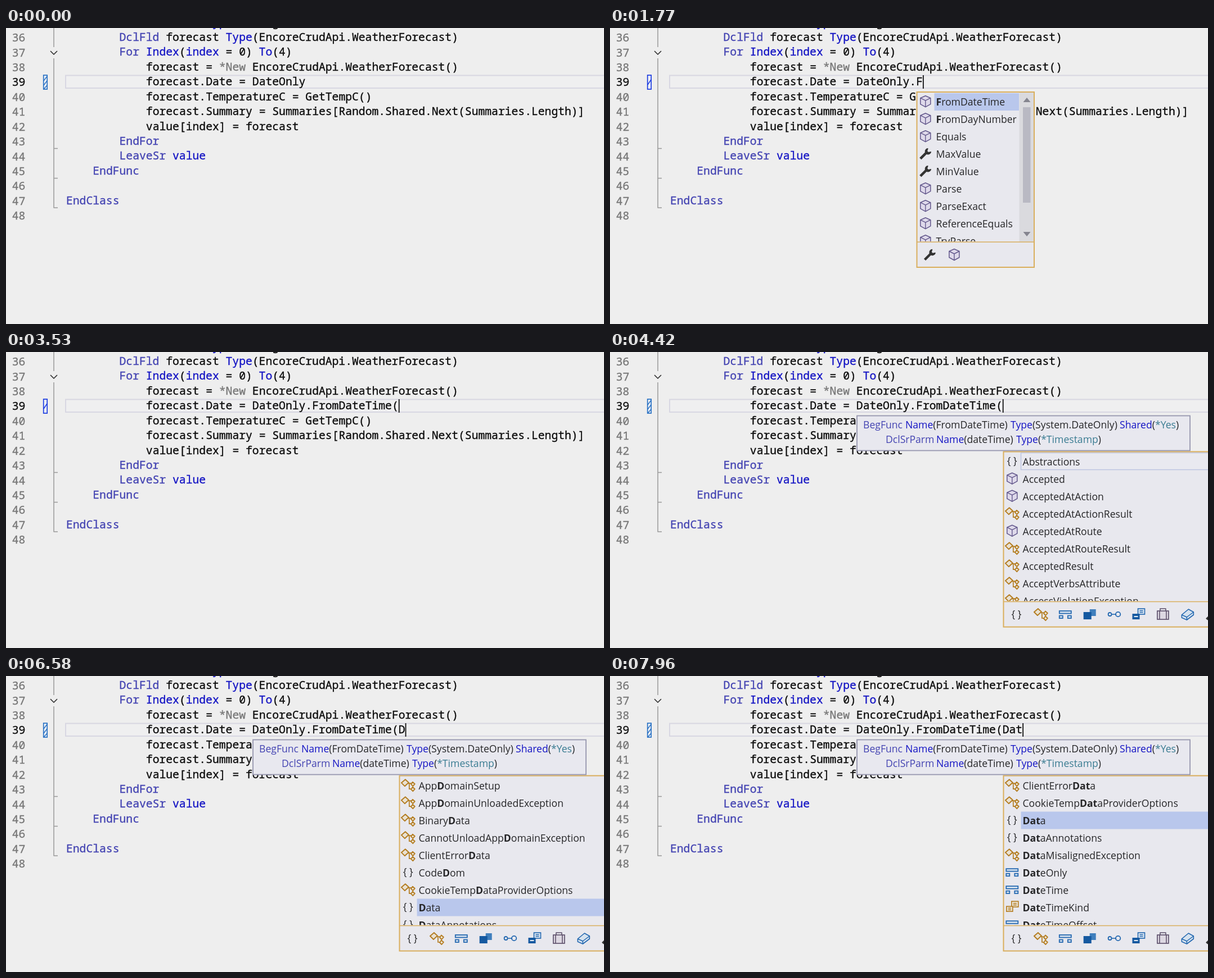
An HTML page that plays this animation: 1063 px wide and 527 px high, repeating every 8000 ms.

```html
<!DOCTYPE html>
<html lang="en">
<head>
<meta charset="utf-8">
<title>Code completion</title>
<style>
html, body { margin: 0; width: 100%; height: 100%; overflow: hidden; background: #eee; }
svg { display: block; }
text { white-space: pre; }
text, tspan { fill: currentColor; }
.code { font: 19.7px "Noto Sans Mono", monospace; color: #0c0c0c; stroke-width: 0.35; }
.code, .code tspan { stroke: currentColor; }
.ui { font: 17.6px "Open Sans", sans-serif; color: #262628; }
.num { color: #777; }
.now { color: #111; }
.key { color: #4444b2; }
.name { color: #1414c4; }
.grey { color: #777; }
.teal { color: #3a7c92; }
.bold { font-weight: 700; }
</style>
</head>
<body>
<svg id="stage" width="1063" height="527" viewBox="0 0 1063 527">
  <defs><clipPath id="rows"><rect width="520" height="266"/></clipPath></defs>
  <g id="base"></g>
  <g id="live"></g>
</svg>
<script>
const LOOP = 8000, CHAR = 11.82, LINE = 26.42, LEFT = 107;
const $ = id => document.getElementById(id);
const lineY = i => 23 + i * LINE;
const colX = c => LEFT + c * CHAR;
const text = (x, y, s, cls) => `<text x="${x}" y="${y}" class="${cls}">${s}</text>`;
const span = (cls, s) => `<tspan class="${cls}">${s}</tspan>`;
const rect = (x, y, w, h, fill, stroke = 'none', sw = 1.6) =>
  `<rect x="${x}" y="${y}" width="${w}" height="${h}" fill="${fill}" stroke="${stroke}" stroke-width="${sw}"/>`;
const path = (d, stroke, sw = 1.6, fill = 'none') =>
  `<path d="${d}" fill="${fill}" stroke="${stroke}" stroke-width="${sw}" stroke-linejoin="round"/>`;
const move = (x, y, s) => `<g transform="translate(${x} ${y})">${s}</g>`;

// Static code, one entry per line from 36 on; line 39 is typed live.
const code = [
  '        DclFld forecast Type(EncoreCrudApi.WeatherForecast)',
  '        For Index(index = 0) To(4)',
  '            forecast = *New EncoreCrudApi.WeatherForecast()',
  '',
  '            forecast.TemperatureC = GetTempC()',
  '            forecast.Summary = Summaries[Random.Shared.Next(Summaries.Length)]',
  '            value[index] = forecast',
  '        EndFor',
  '        LeaveSr value',
  '    EndFunc',
  '',
  'EndClass',
  ''
];
const paint = s => s
  .replace(/DclFld|For(?= )|LeaveSr|End(For|Func|Class)|Type|Index|To(?=\()|index(?= =)|value$|\*New/g,
    w => span(w[0] == '*' ? 'grey' : /^(Type|Index|To|index|value)$/.test(w) ? 'name' : 'key', w));
const codeLine = (i, s) => {
  const body = s.trimStart();
  return text(colX(s.length - body.length), lineY(i), paint(body), 'code');
};

$('base').innerHTML =
  rect(106, 84.5, 970, 22.5, '#efeff0', '#d8d7e2', 2) +
  text(colX(21), lineY(-1), 'Type', 'code name') + text(colX(31), lineY(-1), 'g', 'code') +
  code.map((s, i) => text(10.8, lineY(i) + 1.2, 36 + i, 'code ' + (i == 3 ? 'now' : 'num')) + codeLine(i, s)).join('') +
  path('M85 0V34M85 54V320H92M85 214.5H92M85 267.5H92', '#999', 1.5) +
  path('M79 41L85 47L91 41', '#333', 1.7);

// Icons, each centred on 0,0.
const BLUE = '#2468b0', GOLD = '#b37c20', PURPLE = '#63588c', DARK = '#333', PALE = '#e9e1d2';
const box = (c, fill) => rect(-1, -10, 12, 10, fill, c) + path('M2 -6.5H8M2 -3.5H8', c, 1.4);
const icons = {
  cube: path('M0 -10L9 -6V5L0 10L-9 5V-6Z', PURPLE, 1.5, '#ded9ea') + path('M-9 -6L0 -1.5L9 -6M0 -1.5V10', PURPLE, 1.4),
  wrench: path('M-9 9L2 -2', DARK, 4.5) + path('M4 -9A5 5 0 1 0 9.5 -3L5 -2L2.5 -4.5Z', DARK, 1.5, DARK),
  space: `<text y="6" text-anchor="middle" class="ui">{ }</text>`,
  type: path('M-1 -3H8M2 -3V7H6', GOLD, 1.7) + path('M-5 -10L1 -4.5L-6 2L-12 -4Z', GOLD, 1.9, PALE) +
    path('M8 -5.5L12 -2L8.5 2L5 -1.5ZM8 3.5L12 7L8.5 11L5 7.5Z', GOLD, 1.8, PALE),
  struct: rect(-10.5, -6, 21, 4.5, '#d9e4f0', BLUE, 1.8) + rect(-10.5, 2.5, 6, 4.5, '#d9e4f0', BLUE, 1.8) +
    rect(4.5, 2.5, 6, 4.5, '#d9e4f0', BLUE, 1.8),
  widget: rect(0, -9, 11, 12, '#3f7fbd') + rect(-11, -4, 14, 13, '#1559a0'),
  iface: path('M-4 0H4', BLUE) + `<g fill="none" stroke="${BLUE}" stroke-width="1.8"><circle cx="-7.5" r="3"/><circle cx="7" r="4.2"/></g>`,
  list: box(BLUE, '#d9e4f0') + rect(-11, -1, 13, 10, '#1559a0') + path('M-8 4H-1', '#fff', 1.8),
  pick: box(GOLD, PALE) + rect(-10, -1, 11, 9, PALE, GOLD) + path('M-7 2H-2M-7 5H-2', GOLD, 1.4),
  bag: rect(-10, -6, 20, 15, '#ddd8e2', '#594c68') + path('M-5 -6V-10H5V-6M-6 -6V9M6 -6V9', '#594c68', 1.5),
  brick: path('M-10 1L2 -9L11 -4V1L-1 10L-10 6Z', BLUE, 1.6, '#d5e2ef') + path('M-10 1L-1 5L11 -4M-1 5V10', BLUE, 1.5)
};
const icon = (x, y, k) => move(x, y, icons[k]);

// A list entry is "icon label"; the first hit of the typed text is bold.
function popup(x, y, w, { rows, hit = '', sel, full }, tools, bar) {
  const right = bar ? w - 27 : w;
  let s = rect(0, 0, w, 312, '#e8e8ee');
  let inner = full
    ? rect(31, sel * 31 + 2, right - 31, 31, '#b9c7ec')
    : rect(31, sel * 31 + 2, right - 31, 30, '#e9e9f0', '#bcc4e0', 1.5);
  rows.forEach((row, i) => {
    const [kind, label] = row.split(' '), cy = 17.7 + i * 31;
    inner += icon(15.3, cy - 1, kind) +
      text(34, cy + 6.3, hit ? label.replace(hit, span('bold', hit)) : label, 'ui');
  });
  s += `<g clip-path="url(#rows)">${inner}</g>`;
  if (bar) s += rect(182, 1, 26, 266, '#dadade') + rect(188.5, 27, 13.5, 170, '#b9b9c3') +
    path('M189 18L195.5 10L202 18Z', 'none', 0, '#85858f') + path('M189 249L195.5 257L202 249Z', 'none', 0, '#85858f');
  tools.forEach((k, i) => s += icon(23 + i * 43.4, 289.5, k));
  return move(x, y, s + path(`M0 267H${w}`, '#d9ae5c', 1.6) + rect(0, 0, w, 312, 'none', '#d9ae5c', 2));
}

const members = ['cube FromDateTime', 'cube FromDayNumber', 'cube Equals', 'wrench MaxValue', 'wrench MinValue',
  'cube Parse', 'cube ParseExact', 'cube ReferenceEquals', 'cube TryParse'];
const all = ['space Abstractions', 'cube Accepted', 'cube AcceptedAtAction', 'type AcceptedAtActionResult',
  'cube AcceptedAtRoute', 'type AcceptedAtRouteResult', 'type AcceptedResult', 'type AcceptVerbsAttribute',
  'type AccessViolationException'];
const underD = ['type AppDomainSetup', 'type AppDomainUnloadedException', 'type BinaryData',
  'type CannotUnloadAppDomainException', 'type ClientErrorData', 'space CodeDom',
  'type CookieTempDataProviderOptions', 'space Data', 'space DataAnnotations'];
const underDa = ['type ClientErrorData', 'type CookieTempDataProviderOptions', 'space Data', 'space DataAnnotations',
  'type DataMisalignedException', 'struct DateOnly', 'struct DateTime', 'pick DateTimeKind', 'struct DateTimeOffset'];
const tools = ['space', 'type', 'struct', 'widget', 'iface', 'list', 'bag', 'brick', 'wrench'];

const tip = rect(439, 113.5, 592, 62, '#e8e8ef', '#9696ae', 1.8) + [
  [450, 136, span('key', 'BegFunc')],
  [525, 136, span('name', 'Name') + '(FromDateTime)'],
  [712, 136, span('name', 'Type') + '(System.DateOnly)'],
  [906, 136, span('name', 'Shared') + '(' + span('teal', '*Yes') + ')'],
  [490, 162, span('key', 'DclSrParm')],
  [580, 162, span('name', 'Name') + '(dateTime)'],
  [722, 162, span('name', 'Type') + '(' + span('teal', '*Timestamp') + ')']
].map(([x, y, s]) => text(x, y, s, 'ui')).join('');

// Steps as [start, value]; the latest started one holds.
const at = (steps, t) => steps.filter(([start]) => start <= t).pop()[1];
const typed = [[0, ''], [620, '.'], [1770, '.F'], [2650, '.FromDateTime'], [3190, '.FromDateTime('],
  [6160, '.FromDateTime(D'], [6860, '.FromDateTime(Da'], [7630, '.FromDateTime(Dat']];
const caret = [[0, false], [200, true], [2920, false], [3190, true]];
const small = [[0, null], [830, { rows: members, sel: 0 }],
  [1770, { rows: members, hit: 'F', sel: 0, full: true }], [2650, null]];
const large = [[0, null], [4140, { rows: all, sel: 0 }],
  [6440, { rows: underD, hit: 'D', sel: 7, full: true }],
  [7140, { rows: underDa, hit: 'Da', sel: 2, full: true }],
  [7960, { rows: underDa, hit: 'Dat', sel: 2, full: true }]];

function marker(t) {
  const strong = t >= 200 && t < 4000, c = strong ? '#1c3ce0' : '#2a72c4';
  return rect(66.7, 84, 6.5, 25, '#f0f2f6', c, 1.7) +
    path(strong ? 'M67 101L73 92' : 'M67 94L73 86M67 102L73 94M67 109L73 102', c, 1.5);
}

function draw(t) {
  const line = 'forecast.Date = DateOnly' + at(typed, t);
  const a = at(small, t), b = at(large, t);
  return marker(t) + text(colX(12), lineY(3) - 0.6, line, 'code') +
    (at(caret, t) ? rect(colX(12 + line.length) - 0.2, 84, 1.8, 24, '#111') : '') +
    (a ? popup(545.5, 114, 208.5, a, ['wrench', 'cube'], true) : '') +
    (b ? popup(699.5, 177.5, 400, b, tools) : '') +
    (t >= 4000 ? tip : '');
}

let last = '';
function frame(now) {
  const s = draw(now % LOOP);
  if (s != last) $('live').innerHTML = last = s;
  requestAnimationFrame(frame);
}
frame(0);
</script>
</body>
</html>
```
